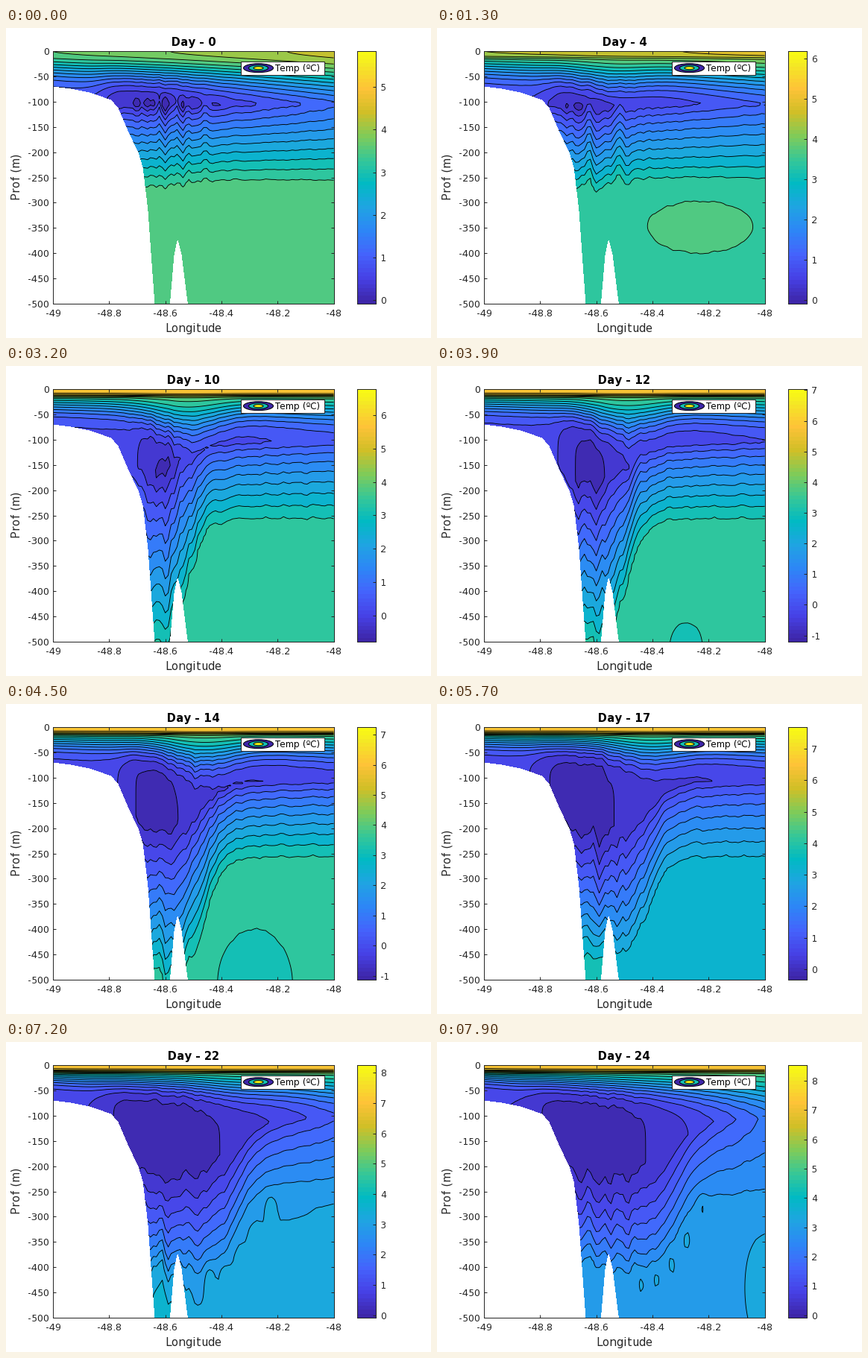
Recreate the animation shown at these times as a matplotlib script. Size 570 by 416 pixels, loop 8 s.

```python
import numpy as np
import matplotlib.pyplot as plt
from matplotlib.animation import FuncAnimation
from matplotlib.colors import LinearSegmentedColormap
from matplotlib.patches import Ellipse, Polygon, Rectangle
from matplotlib.ticker import FormatStrFormatter, MultipleLocator

W, H, FRAMES = 570, 416, 80
PT = 0.72  # points per pixel at 100 dpi
INK = "#262626"
plt.rcParams.update({"font.family": "DejaVu Sans", "axes.unicode_minus": False,
                     "text.hinting_factor": 1})

PARULA = [
    (.242, .150, .660), (.278, .256, .899), (.270, .389, .991),
    (.179, .529, .968), (.125, .646, .888), (.007, .731, .766),
    (.216, .784, .592), (.504, .799, .348), (.820, .750, .154),
    (.997, .766, .220), (.960, .914, .142), (.977, .984, .081)]
STOPS = np.minimum(np.arange(12) * 6, 63) / 63
CMAP = LinearSegmentedColormap.from_list("parula", list(zip(STOPS, PARULA)), 64)
LEVELS = np.arange(22)

# x is degrees east of 49W, z is depth in metres
x = np.linspace(0, 1, 96)[None, :]
z = np.r_[np.linspace(0, 60, 41), np.linspace(63, 500, 100)][:, None]


def track(n, *points):
    """Value at time n on a line through (time, value) points."""
    return np.interp(n, *zip(*points))


def step(v):
    return 1 / (1 + np.exp(-np.clip(v, -40, 40)))


def bell(v):
    return np.exp(-v * v)


# ripples that are strongest over the slope
rng = np.random.default_rng(7)
WAVES = [(2 * np.pi / rng.uniform(.03, .13), rng.uniform(-.015, .015),
          rng.uniform(-.5, .5), rng.uniform(0, 6.3)) for _ in range(9)]
ENV = .15 + bell((x - .42) / .13)


def ripple(n):
    return ENV / 3 * sum(np.sin(k * x + m * z + w * n + p)
                         for k, m, w, p in WAVES)


# passing deep anomalies: time, duration, x, z, width, height, strength
BLOBS = [(13, 10, .77, 340, .27, 80, .9), (45, 8, .72, 510, .16, 130, -1),
         (65, 9, .39, 520, .06, 120, 3), (79, 12, 1, 440, .08, 130, 1.1)]
BLOBS += [(79, 12, a, 430 - 3200 * (a - .56) ** 2, .018, 28, .9)
          for a in .56 + .054 * np.arange(5)]


def limits(n):
    lo = -.08 - 1.15 * bell((n - 41) / 13)
    hi = 5.84 + 2.69 * (n / 79) ** 1.15
    return lo, hi


def field(n):
    """Temperature in contour-level units."""
    r = ripple(n)
    zz = z + track(n, (0, 6), (32, 11)) * r * np.clip((z - 40) / 120, 0, 1)

    # cold pool sinking along the slope and spreading east
    edge = track(n, (13, .45), (32, .47), (79, .69))
    pool = step((edge - x) / .035)
    sink = step((edge - x) / .05) * step((x - .26) / .04)
    z_core = 106 + sink * track(n, (0, 0), (13, 5), (32, 70), (45, 100))
    z_base = 255 + pool * (1 - 1.2 * np.maximum(0, .45 - x)) * track(
        n, (0, 15), (13, 15), (32, 290), (45, 265), (57, 200), (79, 150))

    # coldest value, rising toward the shelf and toward the east
    shelf = track(n, (0, .18), (32, .32), (57, .2), (79, .18))
    gain = track(n, (0, 2.4), (32, 2.7), (45, 1.7), (65, 1.6), (79, 4.2))
    bend = track(n, (0, .9), (32, .35), (57, .5), (65, 1.4), (79, 1.7))
    core = (.55 + (2.7 - .015 * n) * step((shelf - x) / .03)
            + gain * np.clip((x - .42) / .58, 0, 1) ** bend)

    # warm upper water with a sharp mixed layer
    west = 44 - .2 * n
    east = track(n, (0, 74), (32, 54), (65, 49), (79, 64))
    reach = (west + (east - west) * x
             + track(n, (0, 0), (32, 35), (79, 0)) * bell((x - edge) / .14))
    warm = 13 + x * track(n, (0, 2.4), (32, 0))
    u = core + (warm - core) * bell(zz / reach)
    u = u + track(n, (0, 0), (13, 2), (32, 4.8)) * step((13 - zz) / 2)

    # deep water below the core
    deep = track(n, (0, 12), (13, 11), (45, 11), (57, 9), (79, 7))
    t = np.clip((zz - z_core) / (z_base - z_core), 0, 1)
    u = u + (deep - core) * t ** (.75 + .5 * pool * n / 79)
    u = u + .5 * (1 - np.exp(-np.maximum(0, zz - z_base) / 40))

    u = u + .6 * max(0, 1 - n / 28) * bell((z - 102) / 22) * r
    for when, span, a, b, sa, sb, amp in BLOBS:
        u = u + amp * bell((n - when) / span) * bell((x - a) / sa) * bell((zz - b) / sb)
    return np.clip(u, .05, 20.95)


def panel(left, top, w, h):
    ax = fig.add_axes([left / W, 1 - (top + h) / H, w / W, h / H])
    ax.set_axisbelow(False)
    for s in ax.spines.values():
        s.set(linewidth=PT, color=INK, zorder=5)
    return ax


fig = plt.figure(figsize=(W / 100, H / 100), dpi=100, facecolor="white")
ax = panel(63, 31, 376.5, 339)
ax.set(xlim=(-49, -48), ylim=(-500, 0))
ax.xaxis.set_major_locator(MultipleLocator(.2))
ax.yaxis.set_major_locator(MultipleLocator(50))
ax.xaxis.set_major_formatter(FormatStrFormatter("%.4g"))
ax.yaxis.set_major_formatter(FormatStrFormatter("%d"))
ax.tick_params(direction="in", top=True, right=True, length=4 * PT, width=PT,
               color=INK, labelcolor=INK, labelsize=13.33 * PT, pad=5 * PT)
ax.tick_params(axis="x", pad=7 * PT)

SHELF = [(0, 71), (.06, 75), (.125, 82), (.205, 97), (.231, 113), (.268, 161),
         (.303, 202), (.319, 231), (.337, 315), (.361, 501), (0, 501)]
MOUNT = [(.418, 501), (.433, 404), (.444, 375), (.457, 404), (.479, 501)]
for shape in (SHELF, MOUNT):
    ax.add_patch(Polygon([(a - 49, -b) for a, b in shape], fc="white",
                         ec="none", aa=False, zorder=2.2))

cax = panel(471, 31, 25, 339)
bar = cax.imshow(np.arange(64)[:, None], cmap=CMAP, origin="lower",
                 aspect="auto", interpolation="nearest")
cax.set_xticks([])
cax.yaxis.tick_right()
cax.yaxis.set_major_locator(MultipleLocator(1))
cax.yaxis.set_major_formatter(FormatStrFormatter("%d"))
cax.tick_params(direction="in", length=4 * PT, width=PT, color=INK,
                labelcolor=INK, labelsize=12 * PT, pad=6 * PT)

# pixel overlay for labels and legend
top = fig.add_axes([0, 0, 1, 1])
top.set(xlim=(0, W), ylim=(H, 0))
top.axis("off")


def label(px, py, s, size, **kw):
    opts = dict(ha="center", va="baseline", color=INK)
    return top.text(px, py, s, fontsize=size * PT, **{**opts, **kw})


title = label(251.5, 24, "", 14.67, weight="bold", color="black")
label(251.5, 408, "Longitude", 14.67)
label(14, 200, "Prof (m)", 14.67, rotation=90, va="center")
top.add_patch(Rectangle((314.5, 44.5), 112, 18, fc="white", ec=INK, lw=PT))
for w, h, c in ((40, 12, 0.), (26, 8, .5), (13, 4, 1.)):
    top.add_patch(Ellipse((338.5, 53.7), w, h, fc=CMAP(c), ec="black", lw=PT))
label(361, 58, "Temp (ºC)", 12, ha="left", color="black")

drawn = []


def draw(n):
    while drawn:
        drawn.pop().remove()
    grid = x[0] - 49, -z[:, 0], field(n)
    drawn.append(ax.contourf(*grid, levels=LEVELS, cmap=CMAP, vmin=0, vmax=21,
                             zorder=1))
    drawn.append(ax.contour(*grid, levels=LEVELS[1:-1], colors="black",
                            linewidths=.9 * PT, linestyles="solid", zorder=2.1))
    lo, hi = limits(n)
    bar.set_extent((0, 1, lo, hi))
    cax.set_ylim(lo, hi)
    title.set_text(f"Day - {int(.307 * n + .25)}")
    return []


anim = FuncAnimation(fig, draw, frames=FRAMES, interval=100, repeat=True,
                     repeat_delay=0, init_func=lambda: draw(0))
plt.show()
```
